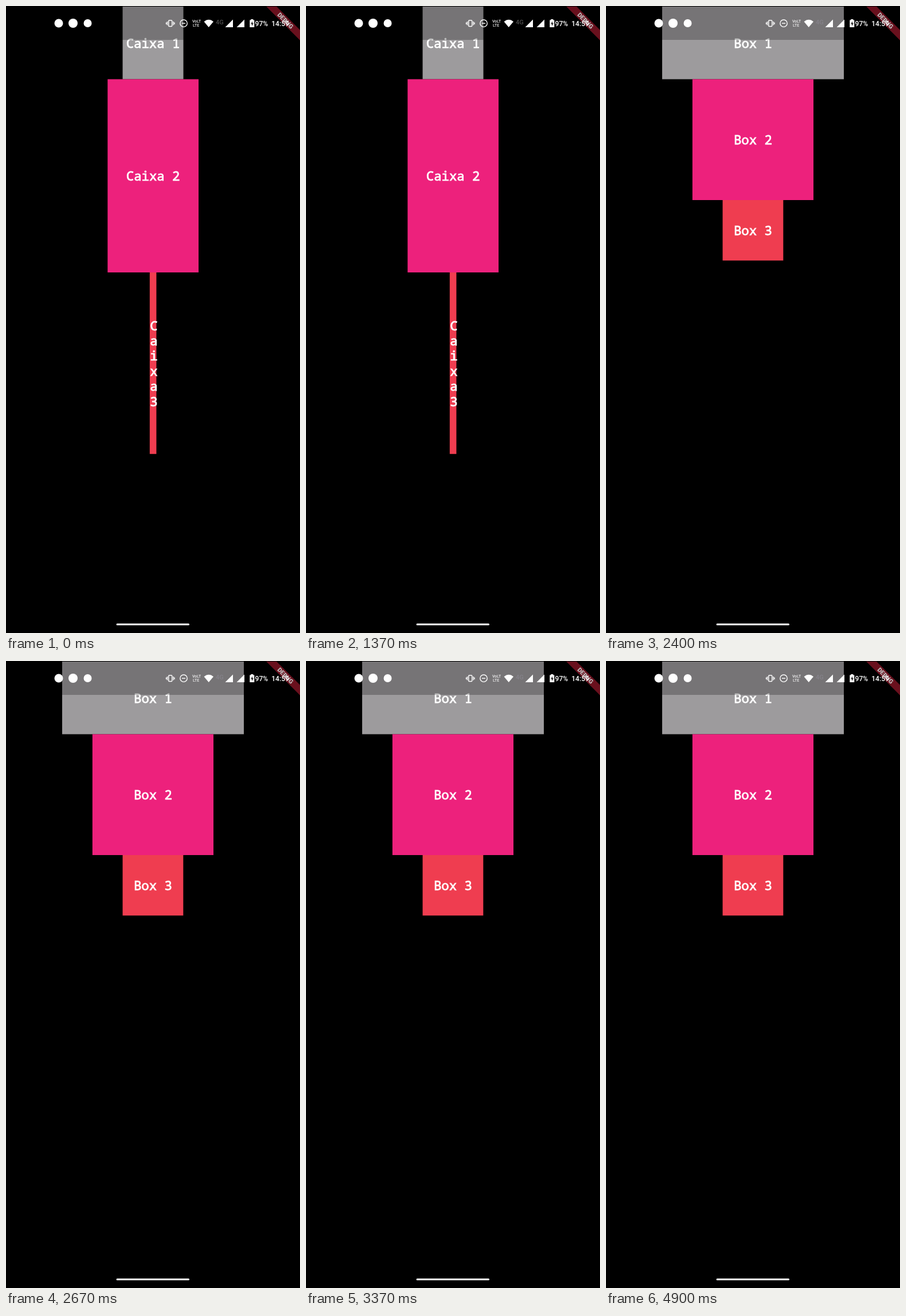
Write an HTML page that moves like this. It is 513 by 1092 pixels and loops after 4.93 s.

```html
<!DOCTYPE html>
<html lang="pt">
<head>
<meta charset="utf-8">
<title>Caixas</title>
<style>
  html, body { margin: 0; width: 100%; height: 100%; overflow: hidden; background: #000; }
  svg { display: block; width: 100vw; height: 100vh; }
  .label { font: 22.3px "Noto Sans Mono", monospace; fill: #fff; stroke: #fff; stroke-width: .85; text-anchor: middle; }
  .status { font: 500 12.1px Roboto, sans-serif; fill: #fff; }
  .tiny { font: 500 6.8px Roboto, sans-serif; fill: #eee; text-anchor: middle; }
</style>
</head>
<body>
<svg viewBox="0 0 513 1092">
  <rect width="513" height="1092" fill="#000"/>
  <g id="boxes"></g>

  <g transform="translate(513 0) rotate(45)">
    <rect x="-44" y="29.6" width="88" height="12.6" fill="#8c1527"/>
    <text y="39.8" text-anchor="middle" fill="#fff"
      style="font: 900 10.8px Roboto, sans-serif">DEBUG</text>
  </g>
  <rect y="1" width="513" height="58" fill="#000" opacity=".25"/>
  <rect width="513" height="1" fill="#000"/>

  <g fill="#fff">
    <circle cx="92" cy="30" r="7.5"/>
    <circle cx="117" cy="30" r="8"/>
    <circle cx="142.5" cy="30" r="7"/>
  </g>

  <g fill="none" stroke="#fff" stroke-width="1.4">
    <rect x="283.7" y="25" width="6" height="10.5" rx="1"/>
    <path d="M281.5 27v6.5M279.6 28.5v3.5M292 27v6.5M293.9 28.5v3.5"/>
    <circle cx="310" cy="30.2" r="6.2"/>
    <path d="M307 30.2h6"/>
  </g>
  <text class="tiny" x="332.5" y="28.8">VoLT</text>
  <text class="tiny" x="331.5" y="36.4">LTE</text>
  <g fill="#fff">
    <path d="M345.5 27.2Q353.7 20.4 362 27.2L353.7 37Z"/>
    <path d="M396 23.5V37H382.5Z"/>
    <path d="M416 23.5V37H402.5Z"/>
    <path d="M427.3 23h4v1.4h2V37h-8V24.4h2Z"/>
  </g>
  <path d="M430 26.5l-3 5h2v3.5l3-5.2h-2Z" fill="#222"/>
  <text id="net" class="status" x="366" y="32" style="font-size:11px">4G</text>
  <text class="status" x="434.6" y="34.7">97%</text>
  <text class="status" x="463.2" y="34.7">14:59</text>

  <rect x="192.5" y="1075.5" width="127.5" height="3" rx="1.5" fill="#fff"/>
</svg>
<script>
const LOOP = 4930, SWITCH = 2270, LINE = 26.4;
const GREY = '#9d9b9d', PINK = '#ed217c', RED = '#ef3d50';

// Each box: x, y, width, height, colour, label lines
const layouts = [
  [
    [203.5, 1, 106, 126.5, GREY, ['Caixa 1']],
    [177.3, 127.5, 158.7, 336.5, PINK, ['Caixa 2']],
    [250.8, 464, 11.6, 316.2, RED, [...'Caixa3']]
  ],
  [
    [98, 1, 317, 126.5, GREY, ['Box 1']],
    [150.8, 127.5, 211.2, 210.5, PINK, ['Box 2']],
    [203.5, 338, 105.8, 105.3, RED, ['Box 3']]
  ]
];

function boxMarkup([x, y, w, h, fill, lines]) {
  const tall = lines.length > 1;
  const tx = tall ? 258 : x + w / 2;
  const base = y + h / 2 + 8.5 - (lines.length - 1) * LINE / 2;
  const text = lines.map((s, i) =>
    `<text class="label" x="${tx}" y="${base + i * LINE}">${s}</text>`).join('');
  return `<rect x="${x}" y="${y}" width="${w}" height="${h}" fill="${fill}"/>${text}`;
}

const boxes = document.getElementById('boxes');
const net = document.getElementById('net');
let shown = -1;

function draw(now) {
  const state = now % LOOP < SWITCH ? 0 : 1;
  if (state !== shown) {
    shown = state;
    boxes.innerHTML = layouts[state].map(boxMarkup).join('');
    net.style.fill = state ? '#85828a' : '#4c4c4c';
  }
}

const start = performance.now();
function tick() {
  draw(performance.now() - start);
  requestAnimationFrame(tick);
}
tick();
</script>
</body>
</html>
```
